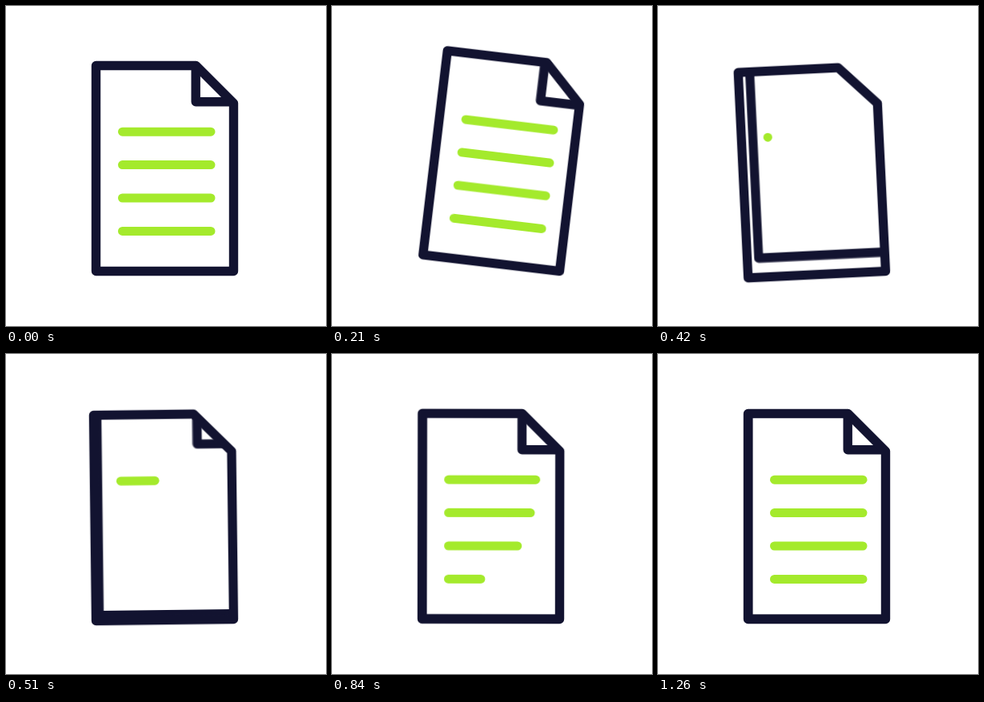
Recreate the animation shown at these times as an HTML page. Size 400 px wide and 400 px high, loop 1830 ms.

```html
<!DOCTYPE html>
<html lang="en">
<head>
<meta charset="utf-8">
<title>Page turn</title>
<style>
  html, body { margin: 0; width: 100%; height: 100%; overflow: hidden; background: #fff; }
  svg { display: block; width: 100vw; height: 100vh; }

  .page, .turn, .corner, .fresh, .fresh path {
    animation: 1830ms cubic-bezier(.25, 0, 0, 1) infinite both;
  }
  .ink { fill: none; stroke: #121330; stroke-width: 11.4; stroke-linejoin: round; }
  .flap { fill: #fff; stroke: #121330; stroke-width: 11.4; stroke-linejoin: round; }
  .text { fill: none; stroke: #a4ea2c; stroke-width: 11; stroke-linecap: round; }

  .page {
    transform-origin: 284.5px 331.5px;
    animation-name: sway;
    animation-timing-function: cubic-bezier(.36, 0, .64, 1);
  }
  .turn { animation-name: turn; }
  .corner { animation-name: corner; }
  .fresh { animation-name: reveal; animation-timing-function: step-end; }
  .fresh path {
    stroke-dasharray: 1 2;
    animation-name: write;
    animation-delay: calc(var(--i) * 111ms);
  }

  @keyframes sway {
    0% { transform: rotate(0deg); }
    10.8% { transform: rotate(6.95deg); }
    21.4% { transform: rotate(-2.95deg); }
    35.2% { transform: rotate(2deg); }
    47.5%, 100% { transform: rotate(0deg); }
  }
  /* the fold sweeps down to the opposite corner */
  @keyframes turn {
    0%, 10.4% { transform: translate(0, 0); }
    34.6%, 100% { transform: translate(-124.5px, 211.5px); }
  }
  /* a new fold slides in from behind the cut corner */
  @keyframes corner {
    0%, 22% { transform: translate(20px, -34px); }
    37.5%, 100% { transform: translate(0, 0); }
  }
  @keyframes reveal {
    0% { visibility: hidden; }
    21.9%, 100% { visibility: visible; }
  }
  @keyframes write {
    0%, 22.68% { opacity: 0; stroke-dashoffset: 1; }
    22.7% { opacity: 1; stroke-dashoffset: 1; }
    51.5%, 100% { opacity: 1; stroke-dashoffset: 0; }
  }
</style>
</head>
<body>
<svg viewBox="0 0 400 400">
  <defs>
    <path id="sheet" d="M112.5 74.5H237.5L284.5 121.5V331.5H112.5Z"/>
    <path id="flap" d="M237.2 -300V119.8H700V-300Z"/>
    <clipPath id="inside"><use href="#sheet"/></clipPath>
  </defs>
  <g class="page">
    <path class="text" d="M145.5 157.2H256M145.5 198.6H256M145.5 240H256M145.5 281.4H256"/>
    <g clip-path="url(#inside)">
      <use class="flap turn" href="#flap"/>
      <use class="flap corner" href="#flap"/>
    </g>
    <g class="text fresh">
      <path style="--i:0" pathLength="1" d="M145.5 157.2H256"/>
      <path style="--i:1" pathLength="1" d="M145.5 198.6H256"/>
      <path style="--i:2" pathLength="1" d="M145.5 240H256"/>
      <path style="--i:3" pathLength="1" d="M145.5 281.4H256"/>
    </g>
    <use class="ink" href="#sheet"/>
  </g>
</svg>
</body>
</html>
```
